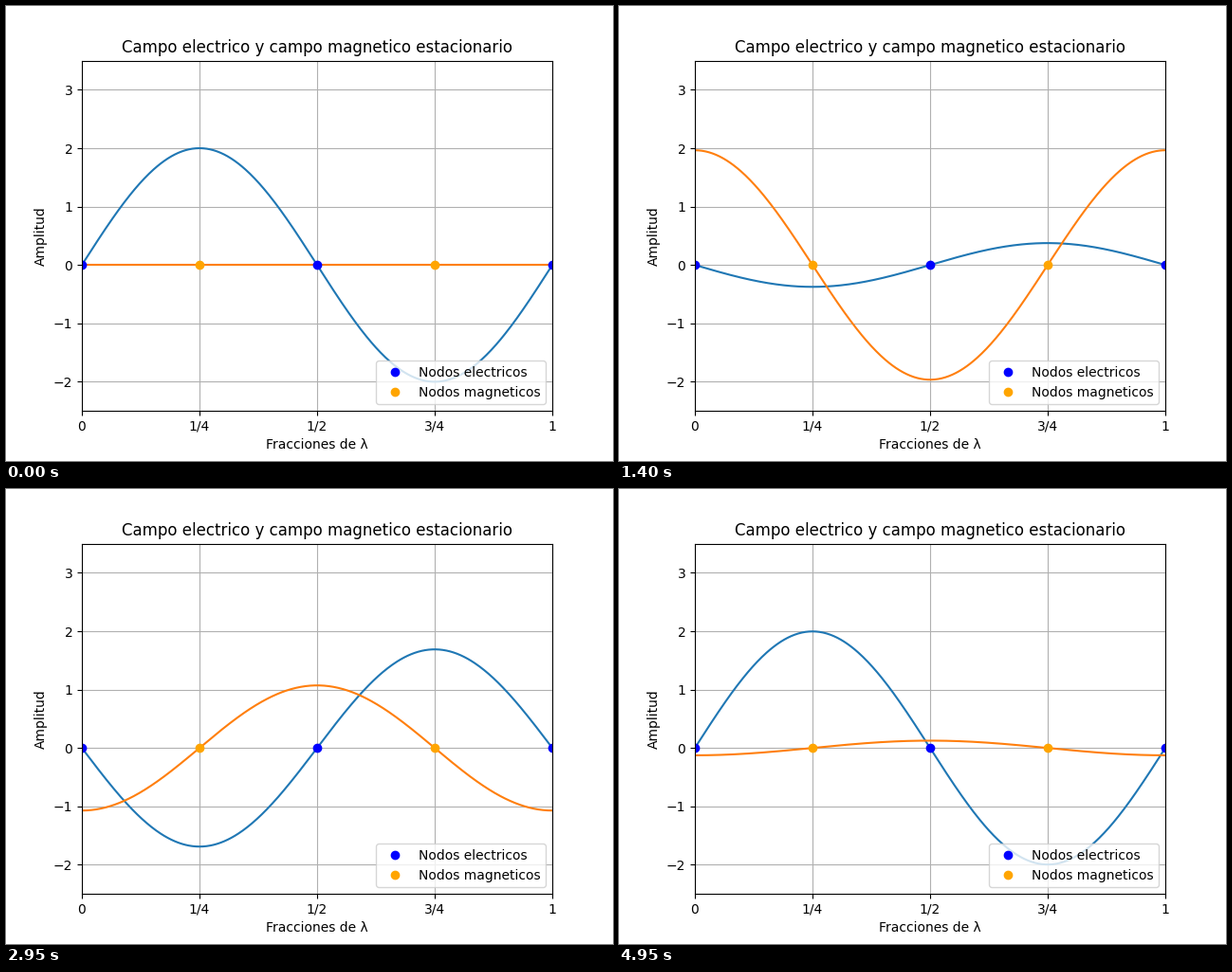
A matplotlib script that plays this animation: 640 by 480 pixels, repeating every 5000 ms.

```python
import numpy as np
import matplotlib.pyplot as plt
from matplotlib.animation import FuncAnimation

FRAMES = 100
INTERVAL = 50
AMPLITUDE = 2

x = np.linspace(0, 1, 401)
electric_shape = AMPLITUDE * np.sin(2 * np.pi * x)
magnetic_shape = AMPLITUDE * np.cos(2 * np.pi * x)

plt.rcParams["font.family"] = "DejaVu Sans"
fig, ax = plt.subplots(figsize=(6.4, 4.8), dpi=100)

electric, = ax.plot(x, electric_shape, color="tab:blue")
magnetic, = ax.plot(x, 0 * x, color="tab:orange")
ax.plot([0, 0.5, 1], [0, 0, 0], "o", color="blue", label="Nodos electricos")
ax.plot([0.25, 0.75], [0, 0], "o", color="orange", label="Nodos magneticos")

ax.set_xlim(0, 1)
ax.set_ylim(-2.5, 3.5)
ax.set_xticks([0, 0.25, 0.5, 0.75, 1], ["0", "1/4", "1/2", "3/4", "1"])
ax.set_yticks(range(-2, 4))
ax.set_title("Campo electrico y campo magnetico estacionario")
ax.set_xlabel("Fracciones de λ")
ax.set_ylabel("Amplitud")
ax.grid(True)
ax.legend(loc="lower right")


def update(frame):
    """Standing waves a quarter period apart."""
    phase = 2 * np.pi * frame / FRAMES
    electric.set_ydata(electric_shape * np.cos(phase))
    magnetic.set_ydata(magnetic_shape * np.sin(phase))
    return electric, magnetic


anim = FuncAnimation(fig, update, frames=FRAMES, interval=INTERVAL,
                     repeat=True, repeat_delay=0)
plt.show()
```
